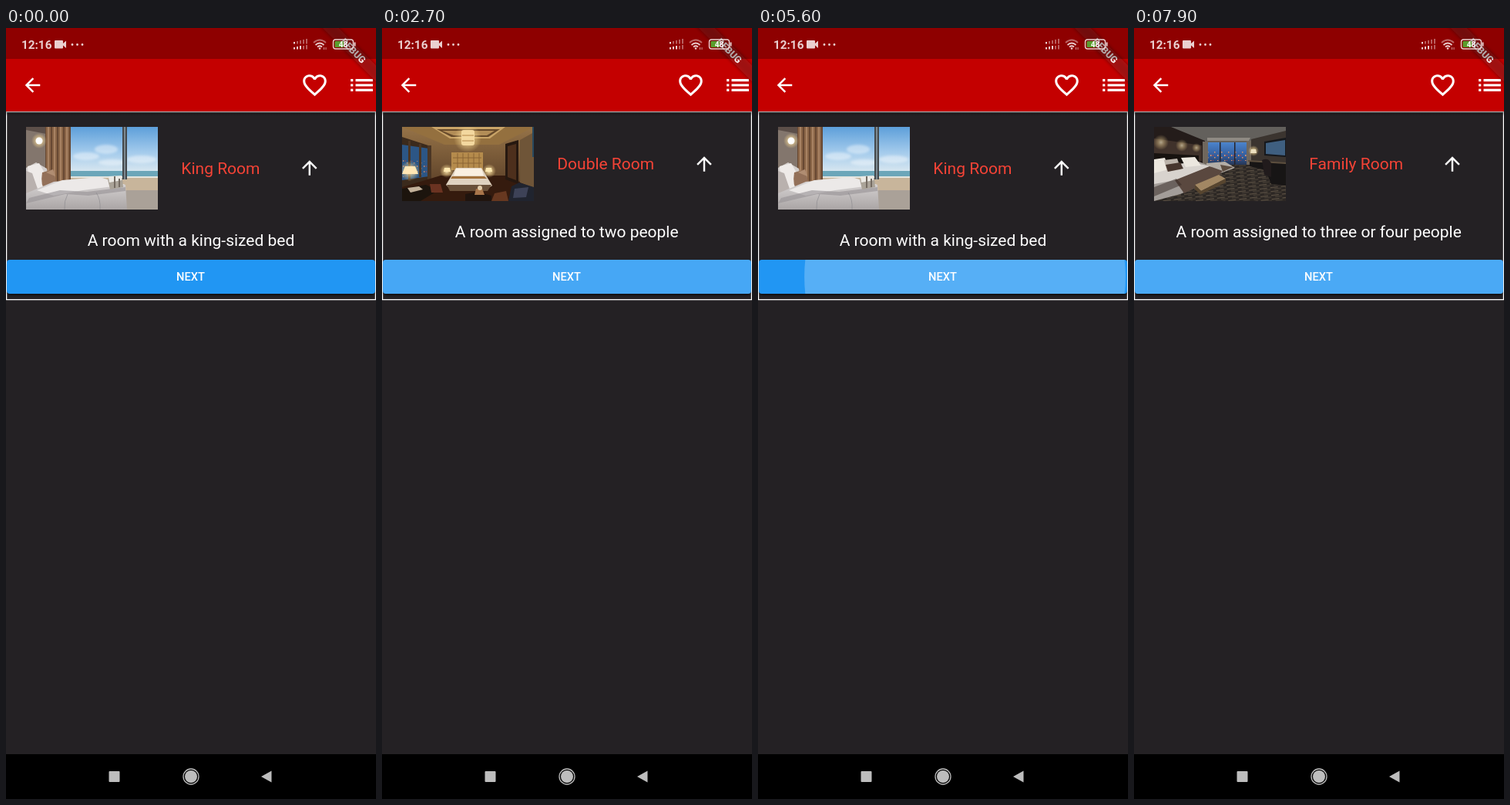
An HTML page that plays this animation: 480 by 998 pixels, repeating every 8 s.

```html
<!DOCTYPE html>
<html lang="en">
<head>
<meta charset="utf-8">
<title>Room picker</title>
<style>
  html, body { margin: 0; width: 100%; height: 100%; overflow: hidden; background: #242124; }
  svg { display: block; width: 100%; height: 100%; }
  text { font-family: Roboto, sans-serif; fill: #fff; }
  .copy { font-size: 21px; }
  .name { fill: #f44336; }
  .mid { text-anchor: middle; }
</style>
</head>
<body>
<svg viewBox="0 0 480 998" preserveAspectRatio="none">
  <defs>
    <linearGradient id="sky" x2="0" y2="1">
      <stop stop-color="#5d9fda"/><stop offset=".55" stop-color="#a4cbec"/><stop offset="1" stop-color="#dce9f0"/>
    </linearGradient>
    <linearGradient id="sheet" x2="0" y2="1">
      <stop stop-color="#dfdcdc"/><stop offset="1" stop-color="#aaa5a5"/>
    </linearGradient>
    <linearGradient id="dusk" x2="0" y2="1">
      <stop stop-color="#4c84cc"/><stop offset=".6" stop-color="#335c9b"/><stop offset="1" stop-color="#253350"/>
    </linearGradient>
    <linearGradient id="gold" x2="0" y2="1">
      <stop stop-color="#967348"/><stop offset="1" stop-color="#4d3420"/>
    </linearGradient>
    <linearGradient id="barShadow" x2="0" y2="1">
      <stop stop-opacity=".4"/><stop offset="1" stop-opacity="0"/>
    </linearGradient>
    <radialGradient id="glow">
      <stop stop-color="#fff4d0"/><stop offset=".4" stop-color="#ffe3a0" stop-opacity=".6"/><stop offset="1" stop-color="#ffdc90" stop-opacity="0"/>
    </radialGradient>
    <pattern id="folds" width="8" height="10" patternUnits="userSpaceOnUse">
      <path fill="#8a6547" d="M0 0h8v10H0z"/><path fill="#674833" d="M0 0h2v10H0z"/><path fill="#a88263" d="M4 0h2v10H4z"/>
    </pattern>
    <pattern id="carpet" width="14" height="5" patternUnits="userSpaceOnUse" patternTransform="rotate(-7)">
      <path fill="#2c2724" d="M0 0h14v5H0z"/><path fill="#5c5144" d="M0 1h10v1.200H0zM5 3.500h9v.8H5z"/>
    </pattern>
    <pattern id="lights" width="9" height="7" patternUnits="userSpaceOnUse">
      <path fill="#e0936a" d="M1 1h1.500v2H1zM6 4h1.500v1.500H6z"/><path fill="#ad3f47" d="M4 1h1v2H4z"/>
    </pattern>
    <clipPath id="tall"><path d="M0 0h171v107H0z"/></clipPath>
    <clipPath id="low"><path d="M0 0h171v96H0z"/></clipPath>
    <clipPath id="buttonClip"><rect x="1" y="300" width="478" height="44" rx="4"/></clipPath>
    <filter id="soft" x="-5%" y="-30%" width="110%" height="160%"><feGaussianBlur stdDeviation="1.6"/></filter>
    <path id="up" fill="#fff" transform="scale(1.222) translate(-12 -12)" d="M4 12l1.410 1.410L11 7.830V20h2V7.830l5.580 5.590L20 12l-8-8z"/>
  </defs>

  <path fill="#242124" d="M0 0h480v998H0z"/>
  <path fill="#c40000" d="M0 0h480v108H0z"/>
  <g fill="#fff">
    <use href="#up" transform="translate(34.500 74) rotate(-90)"/>
    <path transform="translate(400.500 74) scale(1.530) translate(-12 -12)" d="M16.5 3c-1.74 0-3.41.81-4.5 2.09C10.91 3.81 9.24 3 7.5 3 4.42 3 2 5.42 2 8.5c0 3.78 3.4 6.86 8.55 11.54L12 21.35l1.45-1.32C18.6 15.36 22 12.28 22 8.5 22 5.42 19.58 3 16.5 3zm-4.4 15.55l-.1.1-.1-.1C7.14 14.24 4 11.39 4 8.5 4 6.5 5.5 5 7.5 5c1.54 0 3.04.99 3.57 2.36h1.87C13.46 5.99 14.96 5 16.5 5c2 0 3.5 1.5 3.5 3.5 0 2.89-3.14 5.74-7.9 10.05z"/>
    <path transform="translate(461.500 74) scale(1.600) translate(-12 -12)" d="M3 13h2v-2H3zm0 4h2v-2H3zm0-8h2V7H3zm4 4h14v-2H7zm0 4h14v-2H7zM7 7v2h14V7z"/>
  </g>
  <g transform="translate(480 0) rotate(45) scale(1.222)">
    <path fill="#000" opacity=".4" filter="url(#soft)" d="M-60 28H60v12H-60z"/>
    <path fill="#b71c1c" fill-opacity=".627" d="M-60 28H60v12H-60z"/>
    <text class="mid" y="37.600" font-size="10.200" font-weight="900" fill-opacity=".9">DEBUG</text>
  </g>
  <path opacity=".28" d="M0 0h480v40H0z"/>

  <!-- status bar -->
  <g fill="#ead0d0">
    <text x="20" y="27" font-size="15.300" font-weight="700" style="fill:#ead0d0">12:16</text>
    <path d="M64 16h9q1 0 1 1v3l4-3.500v9.500l-4-3.500v3q0 1-1 1h-9q-1 0-1-1v-8.500q0-1 1-1z"/>
    <circle cx="86" cy="21.500" r="1.400"/><circle cx="92.500" cy="21.500" r="1.400"/><circle cx="99" cy="21.500" r="1.400"/>
    <path d="M373 18h2v2.500h-2zM373 25h2v2.500h-2zM377 24h2v3.500h-2zM381 23h2v4.500h-2z"/>
    <path opacity=".45" d="M377 17h2v3.500h-2zM381 16h2v4.500h-2zM385 15h2v5.500h-2zM389 14h2v6.500h-2zM385 23h2v4.500h-2zM389 22h2v5.500h-2z"/>
    <g fill="none" stroke="#ead0d0" stroke-width="1.700">
      <path opacity=".5" d="M399 19q8-7 16 0"/><path d="M401.500 22q5.500-5 11 0M404 24.500q3-2.500 6 0"/>
    </g>
    <circle cx="407" cy="26.500" r="1.300"/><path d="M412 25h1v3h-1zM414.500 25h1v3h-1z" opacity=".7"/>
    <rect x="424.500" y="15" width="26" height="12" rx="3" fill="none" stroke="#ead0d0" stroke-width="1.400"/>
    <rect x="426.500" y="17" width="11.500" height="8" rx="1" fill="#5a9d2d"/>
    <path d="M451.500 18.500h2v5h-2z"/>
    <text x="437.500" y="25" class="mid" font-size="10" font-weight="700">48</text>
  </g>

  <!-- card -->
  <rect x=".6" y="108.600" width="478.800" height="243" fill="none" stroke="#fff" stroke-width="1.300"/>
  <path fill="url(#barShadow)" d="M0 108h480v6H0z"/>

  <g class="room">
    <g transform="translate(26 128)" clip-path="url(#tall)">
      <path fill="#83766d" d="M0 0h171v107H0z"/>
      <path fill="#5c4f49" d="M0 0h26v9L0 4z"/>
      <path fill="url(#sky)" d="M56 0h115v60H56z"/>
      <g fill="#fff" opacity=".4" filter="url(#soft)">
        <ellipse cx="78" cy="38" rx="17" ry="5"/><ellipse cx="104" cy="29" rx="15" ry="6"/>
        <ellipse cx="150" cy="42" rx="19" ry="5"/><ellipse cx="112" cy="46" rx="18" ry="4"/>
      </g>
      <path fill="#6ba6b9" d="M56 57h115v9H56z"/><path fill="#e3e5df" d="M56 64h115v2H56z"/>
      <path fill="#c8b59b" d="M56 66h115v41H56z"/><path fill="#aaa198" d="M124 82h47v25h-47z"/>
      <path fill="url(#folds)" d="M25 0h33v72H25z"/>
      <path fill="#45494c" d="M125 0h6v68h-6z"/><path fill="#b4c9d6" d="M127.500 0h1v68h-1z"/>
      <circle cx="17" cy="18" r="10" fill="url(#glow)"/><circle cx="17" cy="18" r="4.500" fill="#fff"/>
      <path fill="#d3cecc" d="M0 53l13-7 14 8 5 28-32 8z"/><path fill="#eeeae8" d="M2 51l15-4 8 14-2 18-18 5z"/>
      <path fill="#b9b1ae" d="M0 57l8 3 8 23-16 5z"/>
      <path fill="#937059" d="M21 59l14-4 6 24-15 5q-8-8-5-25z"/><path fill="#b08d72" d="M26 59l9-4 3 9z"/>
      <path fill="url(#sheet)" d="M0 86l36-15 59-6 34 10 2 32H0z"/>
      <path fill="#ece9e8" d="M14 82l33-13 48-4 33 10-54 7-38 7z"/>
      <path fill="#9a9698" d="M4 92l40-10 35 2 50-6v5l-48 6-30-2-51 12z" opacity=".65"/>
      <path fill="none" stroke="#87858a" d="M54 87q-5 9-4 20M91 85q6 9 5 22" opacity=".6"/>
      <path fill="#aaa398" d="M106 68l19-2 1 12-17 3z"/><path fill="#eceae5" d="M107 64l17-1v6l-16 3z"/>
      <path fill="#746b62" d="M114 64h2v15h-2zM120 67h2v11h-2z"/>
    </g>
    <text class="copy name" x="227.300" y="188.500">King Room</text>
    <use href="#up" transform="translate(393.800 181)"/>
    <text class="copy mid" x="240" y="281.500">A room with a king-sized bed</text>
  </g>

  <g class="room">
    <g transform="translate(26 128)" clip-path="url(#low)">
      <path fill="url(#gold)" d="M0 0h171v96H0z"/>
      <path fill="#94703f" d="M0 0h171l-45 23H55z"/><path fill="#c9a468" d="M38 0h96l-20 15H62z"/>
      <path fill="#674a2b" d="M45 3h82l-15 10H64z"/><path fill="#b28d57" d="M52 5h68l-10 6H67z"/>
      <path fill="#3b2a1c" d="M0 13l37 12v50L0 87z"/><path fill="#2c5685" d="M0 23l35 5v36L0 69z"/>
      <path fill="url(#lights)" d="M0 43l35 2v17L0 65z" opacity=".7"/>
      <path fill="#4b3624" d="M8 18h3v52H8zM22 22h3v43h-3zM33 24h5v44h-5z"/>
      <path fill="#b58b4c" d="M64 33h41v23H64z"/>
      <path stroke="#8a6434" fill="none" d="M66 40h37M66 47h37M72 34v21M79 34v21M86 34v21M93 34v21M100 34v21"/>
      <path fill="#351b0e" d="M0 78l50-15h84l37 16v17H0z"/>
      <path fill="#261810" d="M134 22l17-5v57l-17-6z"/><path fill="#4d2f1c" d="M137 25l11-3v47l-11-4z"/>
      <path fill="#6f5538" d="M153 17l18-10v72l-18-7z"/><path fill="#28495f" d="M169 0h2v39h-2z"/>
      <circle cx="85" cy="15" r="18" fill="url(#glow)"/><rect x="77" y="4" width="17" height="20" rx="3" fill="#f3d89f"/>
      <path stroke="#b48648" d="M78 11h15M78 18h15"/>
      <circle cx="58" cy="57" r="9" fill="url(#glow)"/><circle cx="113" cy="57" r="9" fill="url(#glow)"/>
      <path fill="#ffe8b0" d="M55 53h7l1 5h-9zM109 53h7l1 5h-9z"/>
      <path fill="#dfd2c0" d="M70 53h33l14 23-7 4H62l-5-5z"/><path fill="#faf0e1" d="M70 54h33l3 9H67z"/>
      <path fill="#a3723c" d="M65 64h42l3 3H63z"/><path fill="#695039" d="M58 75h58l-5 8H62z"/>
      <circle cx="10" cy="57" r="13" fill="url(#glow)"/><path fill="#ffe6b4" d="M4 51h13l4 10H0z"/>
      <path fill="#1c140d" d="M0 80l31-5 16 7-23 14H0z"/><path fill="#c3b19a" d="M7 79l15-2 5 4-16 4z"/>
      <path fill="#6b3321" d="M36 74h14l3 11H38z"/>
      <path fill="#20140e" d="M82 87l16-3 18 5v7H82z"/><path fill="#a8754a" d="M96 80h8l3 8H94z"/><circle cx="101" cy="79" r="3" fill="#e2ccaa"/>
      <path fill="#20242f" d="M142 77l10-5 19 6v18h-33z"/><path fill="#3d4257" d="M146 80l18-2-3 13-17 1z"/>
      <path fill="#673820" d="M120 86l15-3 3 13h-22z"/>
    </g>
    <text class="copy name" x="227.300" y="183">Double Room</text>
    <use href="#up" transform="translate(418 176)"/>
    <text class="copy mid" x="239.700" y="271">A room assigned to two people</text>
  </g>

  <g class="room">
    <g transform="translate(26 128)" clip-path="url(#low)">
      <path fill="#48433f" d="M0 0h171v96H0z"/>
      <path fill="#63605c" d="M20 0h151v11l-46 9H66z"/><path fill="#8f8a83" d="M69 14h56l-2 4H69z"/>
      <path fill="#241c1a" d="M0 0h22l44 18v35L0 63z"/>
      <path fill="#40322b" d="M0 15l62 9v20L0 50z"/><path fill="#17120f" d="M0 34l58 3v10L0 55z"/>
      <g opacity=".6">
        <circle cx="9" cy="20" r="10" fill="url(#glow)"/><circle cx="36" cy="24" r="8" fill="url(#glow)"/><circle cx="55" cy="27" r="6" fill="url(#glow)"/>
      </g>
      <path fill="url(#dusk)" d="M68 20h54v30H68z"/><path fill="url(#lights)" d="M69 31h52v13H69z"/>
      <path fill="#25232a" d="M85 20h1.500v30H85zM104 20h1.500v30H104z"/>
      <path fill="#70675d" d="M63 19h7v32h-7zM120 18h6v34h-6z"/>
      <path fill="#3b342f" d="M126 16l45-11v62l-45-12z"/>
      <path fill="#16181c" d="M143 19l28-5v25l-28-2z"/><path fill="#3f5f80" d="M145 21l25-4v20l-25-2z"/>
      <path fill="url(#carpet)" d="M40 59l52-10h40l39 16v31H0V75z"/>
      <circle cx="129" cy="31" r="7" fill="url(#glow)"/><path fill="#ece0c0" d="M126 29h6l1 5h-8z"/>
      <path fill="#171515" d="M124 44l47 3v29l-19-2-7-18-21-5z"/><path fill="#5d4f3e" d="M122 43l49 3v2l-49-3z"/>
      <path fill="#211b1c" d="M140 43q8-4 12 4v18l-9-3z"/>
      <path fill="#b3ada6" d="M68 47l24-2 13 8-19 7-18-3z"/><path fill="#5d4d40" d="M86 49l17 3-14 6z"/>
      <path fill="#a39d99" d="M0 54l58-9 31 12-12 12-43 18L0 96z"/>
      <path fill="#d8d3ce" d="M0 52l47-6 28 5-42 17L0 74z"/>
      <path fill="#ece7df" d="M0 42l14-2 5 15-19 5zM35 40l18-1 8 11-20 2z"/><path fill="#bcb3aa" d="M13 43l17-2 5 14-18 3z"/>
      <path fill="#47362e" d="M15 49l19-3 4 8-20 4z"/>
      <path fill="#5a483f" d="M27 69l45-18 17 6-8 9-42 20z"/><path fill="#352924" d="M0 78l29-11 7 8-36 15z" opacity=".5"/>
      <path fill="#a28763" d="M53 75l31-13 9 5-32 16z"/><path fill="#57452f" d="M53 75l8 8v5l-8-7zM61 83l32-16v5l-32 15z"/>
    </g>
    <text class="copy name" x="227.300" y="183">Family Room</text>
    <use href="#up" transform="translate(413 176)"/>
    <text class="copy mid" x="239.700" y="271">A room assigned to three or four people</text>
  </g>

  <rect x="2" y="303" width="476" height="43" rx="4" opacity=".55" filter="url(#soft)"/>
  <rect x="1" y="300" width="478" height="44" rx="4" fill="#2196f3"/>
  <g id="ripples" clip-path="url(#buttonClip)" fill="#fff"></g>
  <text class="mid" x="239.500" y="327" font-size="14.700" font-weight="500">NEXT</text>

  <!-- navigation bar -->
  <path d="M0 940h480v58H0z"/>
  <g fill="#bdbdbd">
    <rect x="133.500" y="962" width="14" height="14" rx="1"/>
    <circle cx="240" cy="969" r="8"/><circle cx="240" cy="969" r="10" fill="none" stroke="#bdbdbd" stroke-width="1.300"/>
    <path d="M331 969l13.500-7.500v15z"/>
  </g>
</svg>
<script>
  const LOOP = 8000, HOLD = 100, GROW = 225, FADE_END = 375;
  const TAP_X = 385, MID_X = 239.5, MID_Y = 322, FULL_RADIUS = 242;
  // moments in ms when the finger lifts and the next room appears
  const releases = [2430, 4242, 5510, 6564, 7642];
  const rooms = [...document.querySelectorAll('.room')];
  const layer = document.getElementById('ripples');
  const ripples = releases.map(() => layer.appendChild(
    document.createElementNS('http://www.w3.org/2000/svg', 'circle')));

  const clamp = v => Math.min(1, Math.max(0, v));
  const ease = v => 1 - (1 - v) ** 2.3;
  const mix = (a, b, k) => a + (b - a) * k;

  // Grows slowly while held, quickly after the release, then fades out.
  function drawRipple(circle, up, t) {
    const down = up - HOLD;
    const visible = t >= down && t < up + FADE_END;
    circle.style.display = visible ? '' : 'none';
    if (!visible) return;
    const held = (Math.min(t, up) - down) / 1000;
    const k = ease(clamp(held + Math.max(0, t - up) / GROW));
    const fade = clamp((up + FADE_END - t) / (FADE_END - GROW));
    circle.setAttribute('cx', mix(TAP_X, MID_X, k));
    circle.setAttribute('cy', MID_Y);
    circle.setAttribute('r', FULL_RADIUS * mix(0.3, 1, k));
    circle.setAttribute('opacity', 0.24 * clamp((t - down) / 75) * fade);
  }

  function draw(now) {
    const t = now % LOOP;
    const current = releases.filter(up => t >= up).length % rooms.length;
    rooms.forEach((room, i) => room.style.display = i === current ? '' : 'none');
    releases.forEach((up, i) => drawRipple(ripples[i], up, t));
    requestAnimationFrame(draw);
  }
  draw(0);
</script>
</body>
</html>
```
